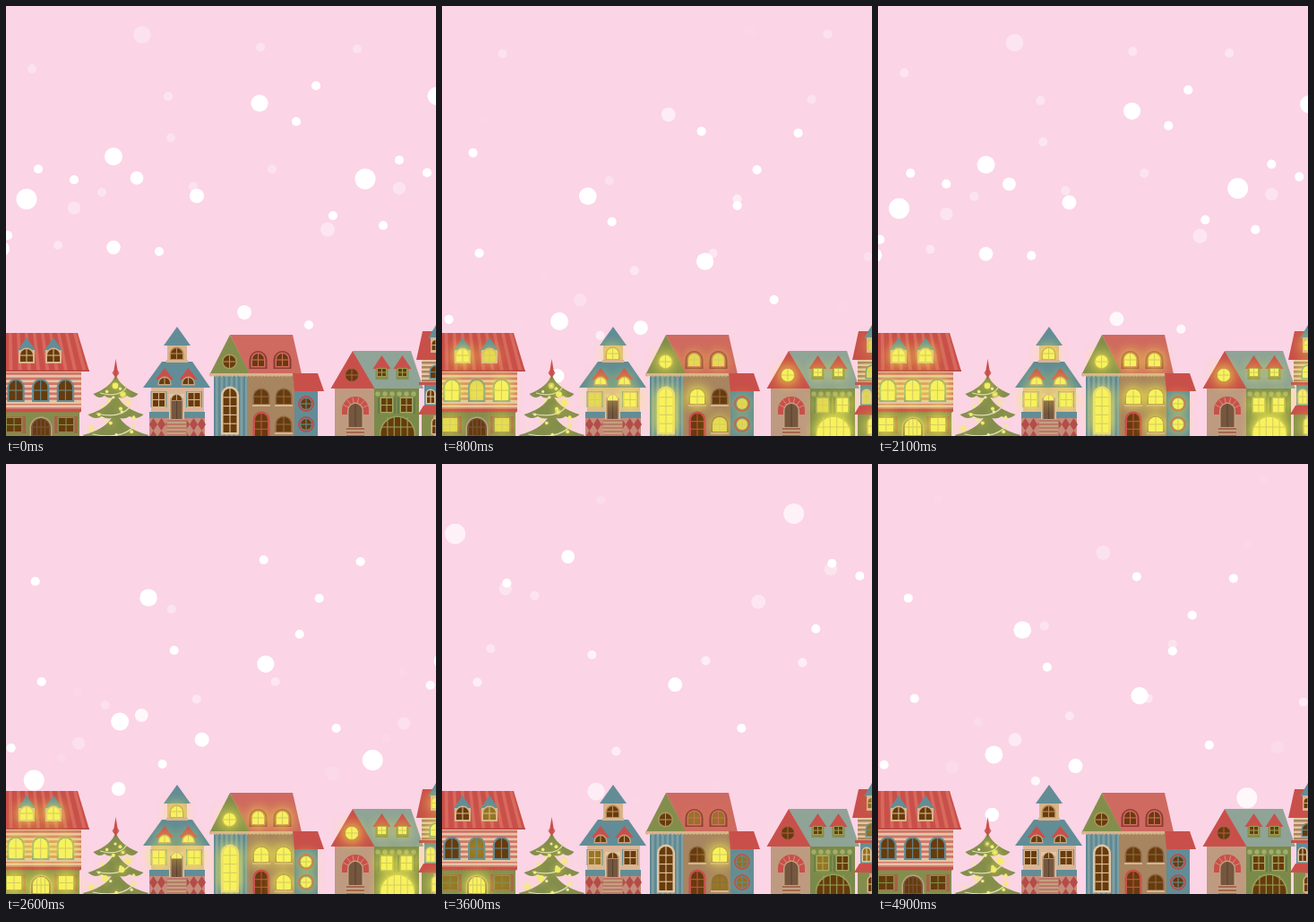
These frames come from a looping animation (480x480 px, 5 s). An HTML page with a canvas:

```html
<!DOCTYPE html>
<html lang="en">
<head>
<meta charset="utf-8">
<title>Snowy village</title>
<style>
html, body { margin: 0; width: 100%; height: 100%; overflow: hidden; background: #fbd4e6; }
canvas { display: block; width: 480px; height: 480px; }
</style>
</head>
<body>
<canvas id="stage" width="480" height="480"></canvas>
<script>
const c = document.getElementById('stage').getContext('2d');
const RED = '#c9504a', ROSE = '#cf6a60', TEAL = '#628d97', GREEN = '#848e4c', TAN = '#d9b48c',
      SAND = '#c3a17f', BROWN = '#673b0c', DARK = '#75563f', CREAM = '#e2c6a2', GREY = '#8fa497';

// Window schedules: frame when the light comes on, frame when it is out
const EARLY = [2, 72], MID = [7, 78], LATE = [14, 90], LAST = [36, 98], NEVER = [0, 0];

const CYCLE = 50, LIFE = 48, FADE = 12, SMALL = 5.1;
// Each batch of snow shares an age and an opacity; flakes are x, y and, if large, radius
const batches = [
  { age: 3.8, peak: 1, flakes: [[152, 32, 9.8], [284, 46], [392, 48], [29, 70], [184, 147]] },
  { age: 12.5, peak: 1, flakes: [[283, 108.5, 9.6], [480.5, 100.5, 10], [346, 89], [324, 129], [36, 182],
    [120, 168, 10], [213, 212, 8], [365, 234], [2, 256], [120, 269.5, 7.8]] },
  { age: 21, peak: 1, flakes: [[23, 215.5, 11.5], [401, 193, 11.5], [171, 274]] },
  { age: 25, peak: 1, flakes: [[146, 192, 7.4], [470, 186]] },
  { age: 34, peak: 1, flakes: [[76, 194], [439, 172], [421, 245], [-4, 271, 8]] },
  { age: 37, peak: 1, flakes: [[266, 342, 8], [338, 356]] },
  { age: 9.5, peak: .42, flakes: [[209, 201.5], [297, 182]] },
  { age: 19, peak: .38, flakes: [[181, 101]] },
  { age: 26, peak: .38, flakes: [[107, 208], [76, 225.5, 7.2], [439, 203.5, 7.2]] },
  { age: 31.5, peak: .42, flakes: [[359, 249.5, 8], [58, 267]] }
];

let frame = 0;
const clamp = v => Math.max(0, Math.min(1, v));

function rect(color, x, y, w, h) { c.fillStyle = color; c.fillRect(x, y, w, h); }

function disc(color, x, y, r) {
  c.fillStyle = color;
  c.beginPath();
  c.arc(x, y, r, 0, 7);
  c.fill();
}

function line(color, width, x1, y1, x2, y2) {
  c.strokeStyle = color;
  c.lineWidth = width;
  c.beginPath();
  c.moveTo(x1, y1);
  c.lineTo(x2, y2);
  c.stroke();
}

// Slab with a level top (x1 to x2) and a level bottom (x3 to x4)
function slab(color, y, x1, x2, h, x3, x4) {
  c.fillStyle = color;
  c.beginPath();
  c.moveTo(x1, y);
  c.lineTo(x2, y);
  c.lineTo(x4, y + h);
  c.lineTo(x3, y + h);
  c.fill();
}

const gable = (color, x, y, w, h) => slab(color, y, x, x, h, x - w / 2, x + w / 2);

function diamond(color, x, y, w, h) {
  gable(color, x, y, w, h / 2);
  gable(color, x, y + h, w, -h / 2);
}

function bars(color, x, y, w, h, gap, upright) {
  for (let p = 0; p < (upright ? w : h); p += gap)
    upright ? rect(color, x + p, y, gap / 2, h) : rect(color, x, y + p, w, gap / 2);
}

function trim(color, x1, x2, y) {
  rect(color, x1, y - 2, x2 - x1, 2.5);
  for (let x = x1 + 2; x < x2; x += 4) disc(color, x, y, 1.8);
}

// kind: 0 square, 1 arched, 2 round; x is the centre, y the top
function shape(color, x, y, w, h, kind, grow = 0) {
  const r = kind ? w / 2 + grow : 0, q = kind === 2 ? r : 0;
  c.fillStyle = color;
  c.beginPath();
  c.roundRect(x - w / 2 - grow, y - grow, w + grow * 2, h + grow * 2, [r, r, q, q]);
  c.fill();
}

function pane(x, y, w, h, kind, [on, off], edge = TAN, rows = 2, cols = 2, rim = 1.5) {
  const lit = clamp(Math.min((frame - on) / 8, (off - frame) / 8));
  shape(edge, x, y, w, h, kind, rim);
  shape(BROWN, x, y, w, h, kind);
  c.save();
  c.globalAlpha = lit * lit;
  c.shadowColor = '#f4ee4c';
  c.shadowBlur = 15;
  for (let i = 0; i < 2; i++) shape('#f7f25c', x, y, w, h, kind);
  c.restore();
  const bar = lit > .7 ? '#d8cd62' : edge, left = x - w / 2;
  for (let i = 1; i < cols; i++) line(bar, 1.1, left + w * i / cols, y, left + w * i / cols, y + h);
  for (let i = 1; i < rows; i++) line(bar, 1.1, left, y + h * i / rows, left + w, y + h * i / rows);
}

function door(x, y, w, h, color, kind = 1) {
  shape(SAND, x, y, w, h, kind, 1.5);
  shape(color, x, y, w, h, kind);
  line('#57402f', 1, x, y, x, y + h);
}

function steps(color, x, y, w) {
  rect(SAND, x - w / 2, y, w, 480 - y);
  bars(color, x - w / 2, y + 1, w, 480 - y, 4);
}

function stripedHouse() {
  rect('#e6c4a5', 0, 408, 84, 44);
  bars('#d0756a', 0, 409, 84, 41, 5.6);
  rect(GREEN, 0, 452, 82, 28);
  slab(RED, 365, 0, 80, 43, 0, 93);
  for (let x = 3; x < 80; x += 9) slab('#d7695d', 365, x, x + 3.5, 42, x * 1.14, x * 1.14 + 4);
  rect('#b64740', 0, 406.5, 93, 1.5);
  [EARLY, LATE].forEach((light, i) => {
    const x = 23 + i * 30;
    gable(TEAL, x, 370, 21, 15);
    rect(TAN, x - 9, 384, 18, 15);
    pane(x, 383, 14, 14, 1, light);
  });
  [MID, LATE, EARLY].forEach((light, i) => pane(11 + i * 27.7, 418, 15, 22, 1, light, TEAL, 2, 2, 2.2));
  rect(CREAM, 0, 442, 84, 2);
  trim(RED, 0, 84, 452);
  for (const x of [9, 67]) {
    rect('#a8604a', x - 13, 458, 26, 19);
    pane(x, 460, 16, 15, 0, LATE, GREEN);
  }
  door(39, 460, 22, 21, DARK);
  pane(39, 461, 18, 18, 1, LAST, DARK, 2, 4, 0);
}

function tree() {
  for (let tier = 2; tier >= 0; tier--) {
    const base = 435 + tier * 23, top = base - 24 - tier * 4, w = 25 + tier * 6, dip = w / 2;
    c.fillStyle = GREEN;
    c.beginPath();
    c.moveTo(122.5, top);
    c.quadraticCurveTo(127, base - 10, 122.5 + w, base - 2);
    for (let i = 1; i <= 4; i++) {
      const x = 122.5 + w - dip * i;
      c.quadraticCurveTo(x + dip / 2, base + 5, x, base - (i === 4 ? 2 : 0));
    }
    c.quadraticCurveTo(118, base - 10, 122.5, top);
    c.fill();
    c.strokeStyle = '#dfdfb8';
    c.lineWidth = 1.2;
    c.beginPath();
    c.moveTo(122.5 - w * .7, base - 3);
    c.quadraticCurveTo(127, base + 3, 122.5 + w * .5, base - 10);
    c.stroke();
  }
  diamond(RED, 122.5, 394, 4, 24);
  diamond(RED, 122.5, 404, 8, 11);
  for (let i = 0; i < 18; i++) {
    const y = 424 + i * 3.2, x = 122 + Math.sin(i * 2.4) * (y - 408) * .42;
    disc('#eeeab0', x, y, 1.6);
    c.save();
    c.globalAlpha = .5 + .5 * Math.cos(frame * Math.PI / 12.5 + i * 2.4);
    c.shadowColor = '#f8f04a';
    c.shadowBlur = 8;
    disc('#f3ee66', x, y, i % 3 ? 2 : 3.4);
    c.restore();
  }
}

function towerHouse() {
  rect(TAN, 180, 378, 22, 20);
  gable(TEAL, 191, 358, 30, 21);
  pane(190.5, 382, 13, 12, 1, MID, '#b88c5e');
  slab(TEAL, 397, 174, 208, 29, 153, 228);
  rect(TAN, 179, 395, 24, 3);
  rect('#d9b598', 162, 426, 59, 28);
  for (const x of [177, 203.5]) {
    gable(RED, x, 404, 20, 13);
    pane(x, 415, 12, 7, 1, EARLY, SAND, 1);
  }
  [LATE, EARLY].forEach((light, i) => {
    const x = 170.5 + i * 39.5;
    rect(TEAL, x - 9, 430, 18, 18);
    pane(x, 432, 13, 15, 0, light, TAN);
  });
  rect(TEAL, 160, 453, 62, 7);
  rect('#c58c7a', 160, 460, 62, 20);
  for (let x = 164.5; x < 222; x += 9)
    for (const y of [460, 474]) diamond('#b44c49', x, y, 9, 14);
  rect(CREAM, 182, 433, 17, 28);
  door(190.5, 439, 12, 22, DARK, 0);
  pane(190.5, 434, 11, 6, 1, EARLY, SAND, 1, 2, .8);
  steps('#bb7867', 190.5, 461, 22);
}

function gableHouse() {
  rect('#5e8995', 232, 411, 37, 69);
  bars('#7f9fa0', 234, 411, 35, 69, 5.5, true);
  rect('#a78561', 269, 411, 53, 69);
  slab(ROSE, 367, 250, 320, 44, 272, 330);
  gable(GREEN, 250, 367, 45, 44);
  trim(TAN, 227, 330, 412);
  pane(249.5, 390, 14, 14, 2, EARLY, '#ab985a');
  for (const x of [281.5, 308.5]) {
    shape('#8c3b34', x, 388, 14, 14, 1, 3);
    pane(x, 388, 13, 14, 1, LATE, ROSE);
  }
  pane(250, 427, 15, 49, 1, MID, CREAM, 5, 2, 2.5);
  const lights = [EARLY, LAST, NEVER, LATE];
  for (let i = 0; i < 4; i++) {
    const x = 285 + i % 2 * 25, y = i < 2 ? 428 : 459;
    if (i === 2) pane(x, 455, 14, 26, 1, NEVER, RED, 3, 2, 2.5);
    else pane(x, y, 16, 16, 1, lights[i], '#8e6846');
    if (i !== 2) rect(TAN, x - 10, y + 17, 20, 2);
  }
  rect(TEAL, 322, 429, 26, 51);
  slab(RED, 410, 320, 348, 20, 322, 355);
  for (const y of [444, 467]) {
    disc('#b84e4b', 335, y, 9);
    pane(335, y - 6, 12, 12, 2, LATE, TEAL, 2, 2, 1);
  }
}

function gardenHouse() {
  rect('#be9b80', 367, 420, 44, 60);
  rect('#7b894b', 411, 427, 50, 53);
  for (let x = 415; x < 460; x += 8) disc('#a2ae66', x, 433, 2.7);
  slab(GREY, 385, 387, 452, 42, 411, 466);
  gable(RED, 387, 385, 49, 42);
  pane(386, 405, 14, 14, 2, EARLY, '#b2594b');
  [EARLY, MID].forEach((light, i) => {
    const x = 419.5 + i * 23;
    rect(GREEN, x - 7, 402, 14, 15);
    gable(RED, x, 390, 20, 15);
    pane(x, 405, 9, 8, 0, light, '#9a9c54', 2, 2, 1);
  });
  shape(RED, 390, 438, 26, 16, 1, 2);
  for (let a = Math.PI * 1.15; a < Math.PI * 1.9; a += .45) {
    const u = Math.cos(a), v = Math.sin(a);
    line('#d69279', 1, 390 + 9 * u, 452 + 9 * v, 390 + 15 * u, 452 + 15 * v);
  }
  door(390, 444, 15, 27, DARK);
  steps('#a7674f', 390, 470, 20);
  [LATE, MID].forEach((light, i) => {
    const x = 425 + i * 22;
    rect('#657b4c', x - 10, 437, 20, 18);
    pane(x, 438, 12, 15, 0, light, '#a6a75f');
  });
  pane(437, 459, 37, 22, 1, MID, '#97a259', 2, 5);
}

function edgeHouse() {
  rect(CREAM, 464, 395, 16, 27);
  bars('#ab8362', 464, 397, 16, 25, 5);
  slab(RED, 363, 465, 480, 32, 458, 480);
  gable(TEAL, 480, 356, 18, 15);
  rect(TAN, 474, 370, 6, 17);
  pane(480, 373, 9, 11, 1, LATE);
  pane(480, 402, 12, 13, 1, LATE, TEAL);
  rect(RED, 461, 420, 19, 3);
  rect(TEAL, 467, 423, 13, 24);
  pane(474, 429, 8, 14, 1, LATE, CREAM);
  rect(GREEN, 464, 452, 16, 28);
  slab(RED, 446, 466, 480, 10, 460, 480);
  rect(SAND, 477, 457, 3, 23);
  pane(480, 461, 8, 16, 1, MID);
}

function snow() {
  for (const { age, peak, flakes } of batches) {
    const now = (age + frame) % CYCLE;
    c.globalAlpha = peak * clamp(Math.min(now / FADE, (LIFE - now) / FADE));
    for (const [x, y, r = SMALL] of flakes) {
      const fall = (now - age) * r * .92;
      disc('#fff', x + fall * .06, y + fall, r);
    }
  }
  c.globalAlpha = 1;
}

function draw(t) {
  const tick = Math.floor(t % 5000 / 100);
  frame = Math.min(117, Math.ceil(tick * 2.4));
  rect('#fbd4e6', 0, 0, 480, 480);
  for (const part of [snow, stripedHouse, tree, towerHouse, gableHouse, gardenHouse, edgeHouse]) part();
  requestAnimationFrame(draw);
}
requestAnimationFrame(draw);
</script>
</body>
</html>
```
